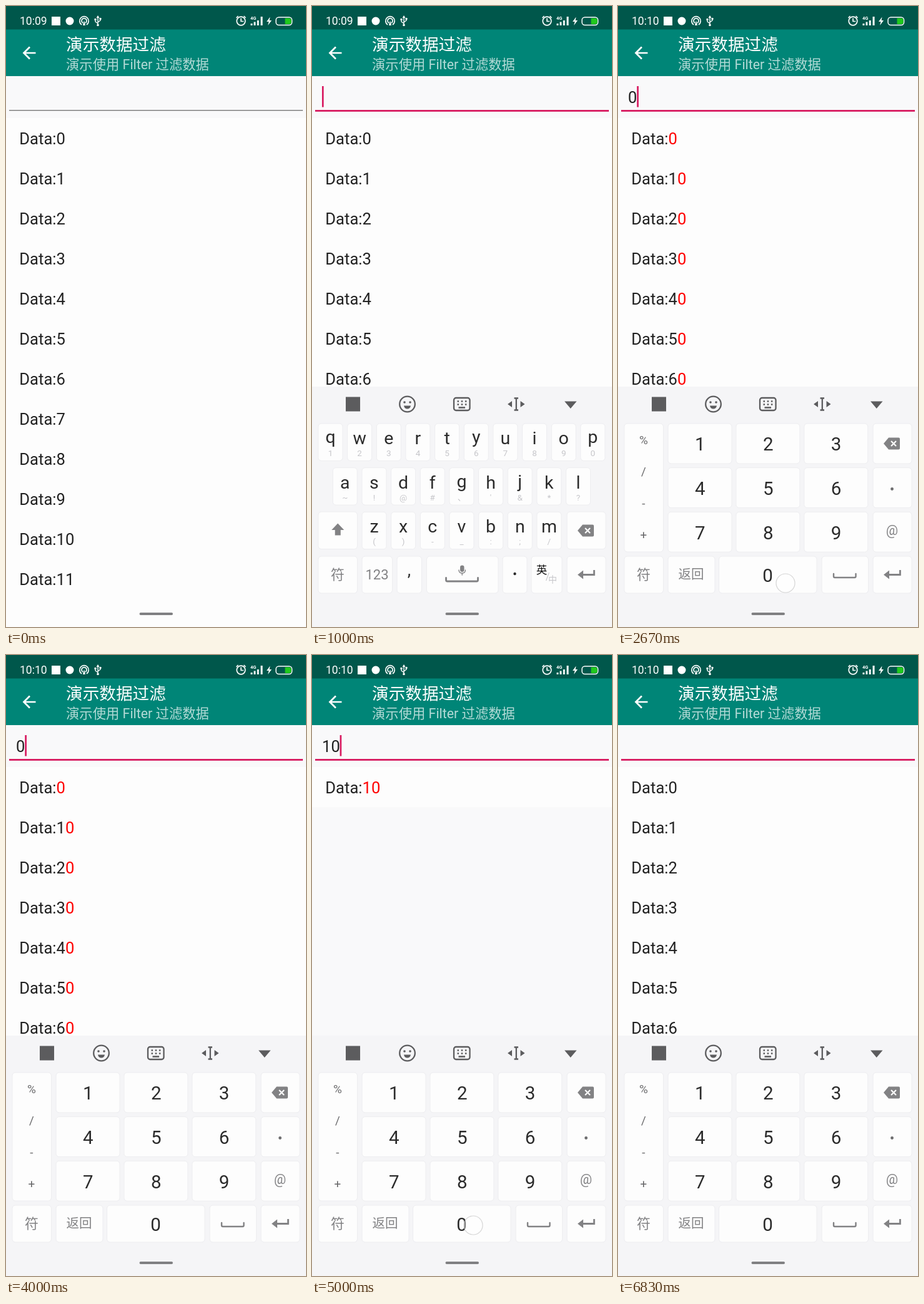
Animation of 480x992 px, one loop 6990 ms. Source, as an HTML page:

```html
<!DOCTYPE html>
<html lang="zh-CN">
<head>
<meta charset="utf-8">
<title>演示数据过滤</title>
<style>
html, body { margin: 0; width: 100%; height: 100%; overflow: hidden; background: #fdfdfd; }
svg { display: block; width: 480px; height: 992px; font-family: Roboto, "Noto Sans CJK SC", "Noto Sans CJK", sans-serif; }
text { white-space: pre; }
.mid { text-anchor: middle; }
.key { fill: #fdfdfd; stroke: #ededf0; stroke-width: 1; }
.line { fill: none; stroke-linecap: round; stroke-linejoin: round; }
.off { display: none; }
</style>
</head>
<body>
<svg viewBox="0 0 480 992">
  <rect width="480" height="992" fill="#fdfdfd"/>
  <rect id="blank" y="243" width="480" height="749" fill="#f9f9fa"/>
  <rect y="112" width="480" height="67" fill="#f9f9fa"/>
  <g id="list" font-size="25.6" fill="#212121"></g>

  <rect width="480" height="38" fill="#00574b"/>
  <rect y="37.5" width="480" height="74.5" fill="#008577"/>
  <g fill="#fff">
    <text id="clock" x="22" y="30" font-size="17.5"></text>
    <rect x="73" y="17" width="14" height="14"/>
    <circle cx="102" cy="24" r="6.5"/>
    <g class="line" stroke="#fff" stroke-width="1.7">
      <path d="M120.5 29.5a7.2 7.2 0 1 1 9 0M122.6 26.8a4 4 0 1 1 4.8 0"/>
      <path d="M147 30V18M147 28l-4-3v-3M147 26l4-3v-3" stroke-width="1.4"/>
      <circle cx="376" cy="24" r="6.8"/>
      <path d="M376 20v4.5h3.5M369 18.5l2-2M383 18.5l-2-2"/>
      <rect x="432" y="18" width="25.5" height="12.5" rx="4.5" stroke-width="1.5"/>
    </g>
    <path d="M125 23l2 8h-4zM147 15l2.4 4h-4.8zM141.5 20h3v3h-3z"/>
    <circle cx="151" cy="20.5" r="1.7"/>
    <circle cx="147" cy="30.5" r="1.8"/>
    <path d="M391.5 28h2.8v3h-2.8zM396.5 25.5h2.8v5.5h-2.8zM401.8 23h2.8v8h-2.8zM407.5 17h3v14h-3z"/>
    <text x="391" y="22" font-size="7.5" font-weight="700">4G</text>
    <path d="M422.5 17.5l-5.5 7.5h3.5l-1.5 6 6-8h-3.5z"/>
    <path d="M446.5 19.5h6.5q3.5 0 3.5 3.5v2.5q0 3.5-3.5 3.5h-6.5z" fill="#20c91c"/>
    <path d="M47.5 75H29M38 65.5L28.5 75l9.5 9.5" fill="none" stroke="#fff" stroke-width="2.7"/>
    <text x="96" y="70.5" font-size="26.67" font-weight="500">演示数据过滤</text>
    <text x="96" y="101" font-size="21.33" fill="#b3dad6">演示使用 Filter 过滤数据</text>
  </g>

  <text id="query" x="16" y="155" font-size="25.6" fill="#212121"></text>
  <rect id="caret" y="128" width="2.7" height="33.5" fill="#d81b60"/>
  <rect id="rule" x="5" width="470"/>

  <g id="board">
    <rect y="608" width="480" height="384" fill="#f5f5f7"/>
    <g fill="#5c5c5e">
      <rect x="54" y="624.5" width="23" height="23"/>
      <g class="line" stroke="#5c5c5e" stroke-width="2.3">
        <circle cx="152.5" cy="636" r="12.3"/>
        <rect x="227" y="626" width="25.5" height="20" rx="3.5"/>
        <path d="M234.5 641.5h10.5M323.5 626.5h6.5M323.5 645.5h6.5M326.8 626.5v19" stroke-linecap="butt"/>
        <path d="M232.5 631.5h15M232.5 636.5h15" stroke-linecap="butt" stroke-dasharray="2.5 3.7"/>
      </g>
      <circle cx="148" cy="633" r="1.8"/>
      <circle cx="157" cy="633" r="1.8"/>
      <path d="M147 638.5h11q-1 5-5.500 5t-5.500-5zM320 631v10l-7-5zM333.5 631v10l7-5zM404 631.5h19.5l-9.8 11.5z"/>
    </g>
    <g id="letters"></g>
    <g id="digits"></g>
  </g>

  <rect x="213.5" y="969" width="53.5" height="4" rx="2" fill="#808082"/>
  <circle id="touch" r="15" fill="#fff" fill-opacity=".4" stroke="#c4c4c4" stroke-opacity=".7" stroke-width="1.2"/>
</svg>
<script>
const LOOP = 6990, TICKS = 42;
const INK = '#2b2b2b', SOFT = '#828284', PALE = '#c6c6ca';
const $ = id => document.getElementById(id);
const esc = s => s.replace(/&/g, '&amp;').replace(/</g, '&lt;');

const label = (x, y, s, size, fill) =>
  `<text class="mid" x="${x}" y="${y}" font-size="${size}" fill="${fill}">${esc(s)}</text>`;
const key = (x, y, w, h) => `<rect class="key" x="${x}" y="${y}" width="${w}" height="${h}" rx="5"/>`;
const stroke = (d, w) => `<path class="line" d="${d}" stroke="${SOFT}" stroke-width="${w}"/>`;

const erase = y => `<path d="M425 ${y}l8-9.5h16q2 0 2 2v15q0 2-2 2h-16z" fill="${SOFT}"/>` +
  `<path d="M437 ${y - 4}l8 8m0-8l-8 8" stroke="#fdfdfd" stroke-width="2.2"/>`;
const enter = `<path d="M425 908.5l9-7v5.5h16v-6h2.8v9h-18.8v5.5z" fill="${SOFT}"/>`;
const edges = key(10, 879, 62.5, 59) + label(41, 915.5, '符', 22, SOFT) + key(408, 879, 62, 59) + enter;

function letterBoard() {
  const rows = [
    ['qwertyuiop', '1234567890', 10],
    ['asdfghjkl', "~!@#、'&*?", 33.3],
    ['zxcvbnm', '()-_:;/', 80]
  ];
  let out = edges;
  rows.forEach(([chars, hints, left], r) => {
    const top = 667 + r * 70.6;
    [...chars].forEach((c, i) => {
      const x = left + i * 46.65, mid = x + 19.5;
      const lift = 'qypgj'.includes(c) ? 2 : 0;
      out += key(x, top, 39, 59.5) + label(mid, top + 33 - lift, c, 28.5, INK) +
        label(mid, top + 52, hints[i], 13.5, PALE);
    });
  });
  out += key(10, 808, 62.5, 59.5) + `<path d="M41.3 826.5l10 10.5h-5.5v8.5h-9v-8.5h-5.5z" fill="${SOFT}"/>`;
  out += key(408, 808, 62, 59.5) + erase(838);
  [[80, 48.5], [136, 39.5], [183.5, 114.5], [305, 39], [351, 49]].forEach(([x, w]) => out += key(x, 879, w, 59));
  out += label(104, 916, '123', 22, SOFT) + label(155.5, 910, ',', 27, INK);
  out += `<circle cx="324.5" cy="907" r="2.2" fill="${INK}"/>`;
  out += stroke('M214.5 913.5v3.5q0 2 2 2h47q2 0 2-2v-3.5', 2.8);
  out += `<rect x="237" y="893.5" width="6.5" height="10.5" rx="3.2" fill="${SOFT}"/>`;
  out += stroke('M235 901q0 5 5.2 5t5.2-5M240.2 906v3', 1.4);
  out += label(367.5, 907, '英', 17.5, '#111') + label(377, 917, '/', 16, PALE) + label(385, 921, '中', 14, PALE);
  return out;
}

function digitBoard() {
  let out = edges + key(10, 667, 62.5, 205);
  ['%', '/', '-', '+'].forEach((c, i) => out += label(41, 700 + i * 50.3, c, 19, '#6c6c6e'));
  for (let i = 0; i < 9; i++) {
    const x = 80 + i % 3 * 108.9, y = 667 + Math.floor(i / 3) * 70.6;
    out += key(x, y, 102, 64) + label(x + 51.3, y + 43.3, String(i + 1), 29.5, INK);
  }
  for (let r = 0; r < 3; r++) out += key(408, 667 + r * 70.6, 62, 64);
  out += erase(699) + `<circle cx="438.5" cy="771.5" r="2.4" fill="#6c6c6e"/>` + label(438.5, 845, '@', 21.5, SOFT);
  out += key(80, 879, 75, 59) + label(117, 915, '返回', 20.5, SOFT);
  out += key(161.5, 879, 156.5, 59) + label(239.5, 919.5, '0', 29.5, INK);
  out += key(326, 879, 74.5, 59) + stroke('M345 907v4q0 2 2 2h31.5q2 0 2-2v-4', 2.4);
  return out;
}

$('letters').innerHTML = letterBoard();
$('digits').innerHTML = digitBoard();

// Ticks at which the query changes, and touches as [from, to, x, y]
const queries = [[0, ''], [4, ''], [16, '0'], [26, ''], [28, '1'], [30, '10'], [36, '1'], [38, '']];
const touches = [
  [3, 5, 200, 146], [9, 11, 104, 908], [15, 17, 268, 922], [25, 27, 441, 700],
  [27, 29, 131, 703], [29, 31, 258, 911], [35, 37, 443, 702], [37, 39, 443, 702]
];
const data = Array.from({ length: 100 }, (_, i) => String(i));
const show = (id, on) => $(id).classList.toggle('off', !on);
const set = (id, attrs) => Object.entries(attrs).forEach(([k, v]) => $(id).setAttribute(k, v));

function drawList(query) {
  const hits = data.filter(d => d.includes(query)).slice(0, 12);
  $('list').innerHTML = hits.map((d, i) => {
    const marked = query ? d.replace(query, `<tspan fill="#f00">${query}</tspan>`) : d;
    return `<text x="21.33" y="${220.5 + i * 64}">Data:${marked}</text>`;
  }).join('');
  show('blank', hits.length === 1);
}

function draw(tick) {
  const [since, query] = queries.filter(q => q[0] <= tick).pop();
  const focus = tick >= 4;
  drawList(query);
  $('query').textContent = query;
  $('clock').textContent = tick < 13 ? '10:09' : '10:10';
  set('rule', focus ? { y: 166, height: 2.8, fill: '#d81b60' } : { y: 166, height: 1.4, fill: '#777' });
  set('caret', { x: 16 + query.length * 14.3 });
  show('caret', focus && (tick - since) % 6 < 3);
  show('board', tick >= 5);
  show('letters', tick < 10);
  show('digits', tick >= 10);
  const touch = touches.find(([a, b]) => tick >= a && tick < b);
  show('touch', touch);
  if (touch) set('touch', { cx: touch[2], cy: touch[3] });
}

let last = -1;
const start = performance.now();
function loop() {
  const tick = Math.floor((performance.now() - start) % LOOP / LOOP * TICKS);
  if (tick !== last) draw(last = tick);
  requestAnimationFrame(loop);
}
loop();
</script>
</body>
</html>
```
